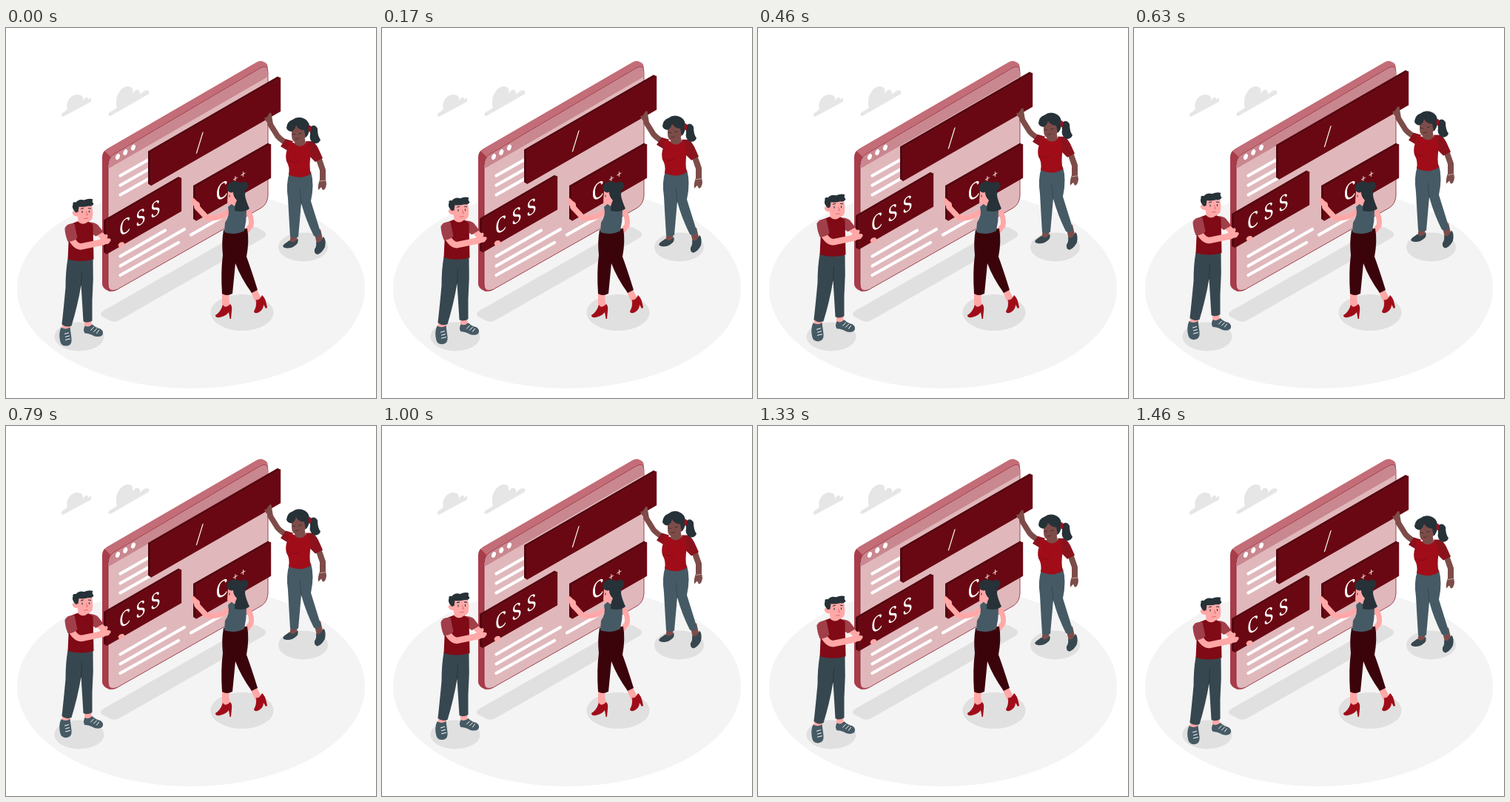
Animation of 500x500 px, one loop 1.5 s. Source, as an HTML page:

```html
<!DOCTYPE html>
<html lang="en">
<head>
<meta charset="utf-8">
<title>Building a page</title>
<style>
  html, body { margin: 0; width: 100%; height: 100%; overflow: hidden; background: #fff; }
  svg { display: block; width: 100%; height: 100%; }
  text { font: 500 28px "Noto Serif", serif; fill: #fff; }
  .shade { fill: #e0e0e0; }
  .cloud { fill: #e6e6e6; }
  .dark { fill: #263238; }
  .slate { fill: #37474f; }
  .steel { fill: #455a64; }
  .skin { fill: #ffa8a7; }
  .brown { fill: #7d4c49; }
  .shirt { fill: #800a15; }
  .red { fill: #a00d19; }
  .sleeve { fill: #8a121d; }
  .edge { fill: #55060f; }
  .front { fill: #690812; stroke: #7c1d27; stroke-width: .4; }
  .line { fill: none; stroke-linecap: round; stroke-linejoin: round; }
  .white { stroke: #fff; }
  .limb { stroke: #ffa8a7; }
  .limb.deep { stroke: #7d4c49; }
  .ink { stroke: #263238; }
</style>
</head>
<body>
<svg viewBox="0 0 500 500">
  <!-- ground and sky -->
  <ellipse cx="250" cy="352" rx="235" ry="135" fill="#f4f4f4"/>
  <g class="shade">
    <path d="M130 383 328 270Q334 267 340 270L349 275Q353 279 349 283L153 395Q147 398 142 396L130 390Q126 387 130 383z"/>
    <ellipse cx="99" cy="417" rx="33.500" ry="19.500"/>
    <ellipse cx="319" cy="384.500" rx="42.500" ry="24.500"/>
    <ellipse cx="401.500" cy="296" rx="33.500" ry="19.500"/>
  </g>
  <g class="cloud">
    <path d="M77 120Q73 118 76 115L83 110C80 99 88 90 96 90C103 90 105 94 104 99C107 92 112 93 111 97C115 92 117 97 114 100z"/>
    <path d="M141 119Q136 118 140 114L150 108C146 96 153 80 164 79C172 79 172 84 171 89C175 81 182 82 181 90C188 82 195 83 193 89z"/>
  </g>

  <!-- browser window -->
  <path d="M130 175Q130 167 137 163L339 46Q344 43 349 46L352 48Q354 50 354 57L150 354Q143 358 138 355Q130 352 130 345z" fill="#c26d77"/>
  <path d="M130 175Q130 170 133 166L141 174 138 187V350L142 356Q139 356 137 354.500Q130 351 130 345z" fill="#a93c4a"/>
  <path d="M138 187Q138 175 147 170L344 54Q354 49 354 60V227Q353 238 345 243L150 353.500Q138 358 138 346z" fill="#e0b8bc" stroke="#8f1f2c" stroke-width=".8"/>
  <path d="M138.500 190V186Q139 175 147 170.500L344 54.500Q353.500 49.500 353.500 60V66z" fill="#c9878f"/>
  <g fill="#fff">
    <ellipse cx="151" cy="174" rx="2.700" ry="4.200" transform="rotate(20 151 174)"/>
    <ellipse cx="161.300" cy="168" rx="2.700" ry="4.200" transform="rotate(20 161.300 168)"/>
    <ellipse cx="172" cy="161.500" rx="2.700" ry="4.200" transform="rotate(20 172 161.500)"/>
  </g>
  <path class="line white" stroke-width="4.200" d="M154.500 199.500 196 176M154.500 212.500 196 189M154.500 225.500 194 203M154.500 308.500 215 273.500M154.500 321.500 241 272M154.500 334 233 290M250 279.500 300 251"/>

  <!-- resting bar -->
  <path class="edge" d="M253 213 354 155.500 358 157.500V202.500L257 260.500 253 258z"/>
  <path class="front" d="M257 215 358 157V202.500L257 260.500z"/>
  <g transform="matrix(.866 -.5 0 1 283.500 235.500)">
    <text style="font-size:30px">C</text>
    <text x="26 38" y="-11" style="font-size:16px">++</text>
  </g>

  <!-- woman at the resting bar -->
  <g>
    <path class="line limb" stroke-width="7" d="M328 249Q333 259 331 267L323 277"/>
    <path class="skin" d="M292 352 305 352 301 364 303 376 295 383 292 376zM328 350 337 350 346 367 339 375z"/>
    <path class="red" d="M293 374Q296 380 303 373Q306 376 305 382L304 393 302.500 393 301 384Q298 389 289 391Q283 392 283 388Q290 384 293 374zM338 367Q342 369 346 361Q350 364 352 373L353 378 351 379 348 374Q348 380 342 384Q336 387 335 383Q339 376 338 367z"/>
    <path d="M294 273 326 271Q329 288 325 309Q332 328 340 354L332 358Q317 337 310 318L306 359Q298 363 292 359Q290 329 293 307Q291 289 294 273z" fill="#3b040b"/>
    <path class="line limb" stroke-width="7.500" d="M300 249Q286 259 271 256L258 242"/>
    <path class="steel" d="M300 242 305 237 318 239 325 247Q325 261 322 274Q310 281 295 276L296 263Q303 254 300 242z"/>
    <path class="skin" d="M251 235Q250 229 254 230L258 234Q263 236 262 241L264 246 257 247z"/>
    <path class="skin" d="M300 220 314 218 315 238Q310 243 305 238Q300 240 299 235z"/>
    <circle class="dark" cx="321.500" cy="213.500" r="6"/>
    <path class="dark" d="M298 217Q299 208 309 207Q318 208 321 215Q324 220 323 226Q324 233 329 244Q322 250 309 247Q309 238 312 233Q307 228 307 222Q301 224 298 217z"/>
    <path class="line ink" stroke-width="1" d="M302 226v2"/>
  </g>

  <g id="lifted">
    <!-- long bar -->
    <path class="edge" d="M192 167 367 66 371 68V113L196 213.500 192 211z"/>
    <path class="front" d="M196 168.500 371 67.500V113L196 213.500z"/>
    <text transform="matrix(.866 -.5 -.12 1 257 167)" style="font-size:29px">/</text>

    <!-- short bar -->
    <path class="edge" d="M132 260 233 201.500 237 203.500V248L136 306 132 303.500z"/>
    <path class="front" d="M136 261.500 237 203V248L136 306z"/>
    <text transform="matrix(.866 -.5 0 1 153 283)" x="0 26 49">CSS</text>

    <!-- man -->
    <g transform="translate(.5 1)">
      <path class="skin" d="M151 293Q153 288 158 289Q162 292 158 294L153 297z"/>
      <path class="skin" d="M75 396H87L86 410H76zM105 391H115V406H106z"/>
      <path class="steel" d="M74 404Q80 408 86 404L88 419Q89 428 82 429Q75 430 73 424Q70 413 74 404zM106 402Q111 405 116 400Q121 405 127 406Q132 409 130 414Q127 418 119 416Q112 412 106 412Q103 408 106 402z"/>
      <path class="line white" stroke-width="1" d="M79 413 84 411.500M80 417 85 415.500M80 421 86 419.500M114 408 118 404M118 410 122 406M122 412 125 408"/>
      <path class="slate" d="M83 311H117Q118 340 116 368L116 395Q110 399 104 396L101 347Q96 376 88 402Q81 405 75 400Q78 372 80 350Q80 328 83 311z"/>
      <path class="line" stroke="#263238" stroke-width=".8" d="M101 347 102 328"/>
      <path class="line limb" stroke-width="8" d="M121 273 131 282"/>
      <path d="M112 262Q120 262 124 266L131 275 121 281 113 276z" fill="#a03f49"/>
      <path class="shirt" d="M83 266 97 260.500Q104 266 110 260.500L117 265 118 312Q101 317 83 312L84 290z"/>
      <path class="skin" d="M97 253H110L110 261.500Q104 267 97 261.500z"/>
      <path class="line limb" stroke-width="8.500" d="M87 282Q93 295 101 295L130 289"/>
      <path class="skin" d="M125 286 132 280Q137 276 137 281L136 284Q142 283 141 287L138 291 128 293z"/>
      <path d="M92 264Q82 263 79 270Q79 278 83 288Q90 289 96 283z" fill="#a03f49"/>
      <path class="skin" d="M95 240 115 237Q118 248 116 257Q112 263 105 262Q97 261 96 254Q90 254 89 249Q90 245 95 247z"/>
      <path class="dark" d="M92 247Q88 242 90 238Q89 234 94 235Q98 230 105 232Q112 229 117 231Q115 234 118 237Q116 241 111 240Q104 242 98 241L97 248 94 249z"/>
      <path class="line ink" stroke-width="1.100" d="M102.500 247v2M112 246.500v2M101 244 104 243M111 243 114 243.500"/>
      <path class="line" stroke="#d96f70" d="M108 248 110 252 108 252M105 257 110 256.500"/>
    </g>

    <!-- woman at the long bar -->
    <g transform="translate(0 .5)">
      <path class="brown" d="M385 278H394L392 291 383 292zM416 274 425 272 429 289 421 296z"/>
      <path class="slate" d="M383 287Q389 293 394 284Q396 290 392 293Q385 299 377 297Q372 296 376 292zM419 289Q425 292 429 282Q433 286 431 296Q427 304 421 306Q416 305 417 299Q420 295 419 289z"/>
      <path class="steel" d="M383 195 412 194Q417 211 412 234L426 279Q421 284 416 281Q405 259 399 237L395 282Q390 285 384 282Q382 249 381 230Q378 211 383 195z"/>
      <path class="line" stroke="#37474f" stroke-width=".9" d="M399 237 397 218"/>
      <path class="line limb deep" stroke-width="8" d="M421 172 428 192 428 208"/>
      <path class="brown" d="M424 205 432 204 433 211Q432 219 428 219L426 215 422 219Q421 213 424 205z"/>
      <path class="line white" stroke-width=".5" d="M424.500 207 431.500 206"/>
      <path class="line limb deep" stroke-width="7.500" d="M386 159Q373 153 367 146L357 130"/>
      <path class="brown" d="M350 124Q348 120 352 121L356 115Q359 113 359 118L361 130 357 133z"/>
      <path class="sleeve" d="M388 153 378 150 371 160 381 166zM405 153 414 153Q420 157 424 167L428 176 418 181 409 172z"/>
      <path class="red" d="M382 153 391 156 408 155 412 170Q409 187 412 197Q398 206 382 198Q384 188 379 180Q377 172 380 164z"/>
      <path class="line" stroke="#7d0a15" stroke-width=".8" d="M381 178Q388 184 395 179"/>
      <path class="brown" d="M391 147 403 145 405 156Q398 163 390 157z"/>
      <path class="brown" d="M386 133 403 131 406 146Q401 154 393 155Q386 154 386 145z"/>
      <path class="dark" d="M411 134Q417 129 421 136Q421 146 425 151Q423 157 416 156Q409 151 411 144zM379 135Q380 126 387 124Q395 118 404 123Q411 127 410 137Q409 145 405 148L403 138Q396 138 392 132Q390 139 385 140Q380 139 379 135z"/>
      <ellipse class="red" cx="410.500" cy="136" rx="1.800" ry="4.500"/>
      <path class="line ink" stroke-width="1" d="M388 143.500 390.500 144M396 143 399 142"/>
      <path class="line" stroke="#512b2b" stroke-width=".9" d="M391 150Q394 151 396 149"/>
    </g>
  </g>
</svg>
<script>
  const LOOP = 1500, LEAD = 40, RISE = 10;
  const lifted = document.getElementById("lifted");

  // Steady climb for half the loop, steady descent for the rest
  function draw() {
    const phase = (performance.now() + LEAD) % LOOP / LOOP;
    const lift = RISE * (1 - Math.abs(1 - 2 * phase));
    lifted.setAttribute("transform", `translate(0 ${-lift})`);
    requestAnimationFrame(draw);
  }
  draw();
</script>
</body>
</html>
```
